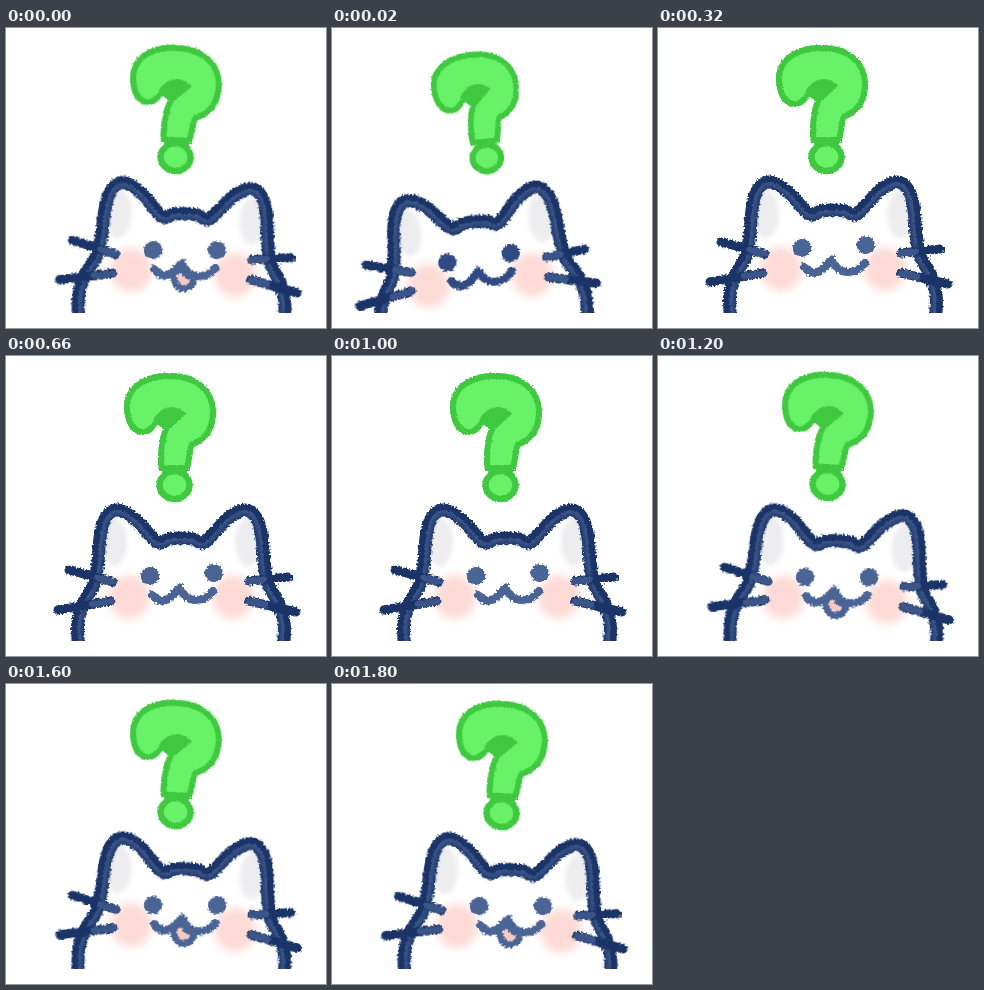
These frames come from a looping animation (320 px wide and 300 px high, 1.97 s). An HTML page:

```html
<!DOCTYPE html>
<html lang="en">
<head>
<meta charset="utf-8">
<title>Puzzled cat</title>
<style>
  html, body { margin: 0; width: 100%; height: 100%; overflow: hidden; background: #fff; }
  svg { display: block; width: 100vw; height: 100vh; }
</style>
</head>
<body>
<svg viewBox="0 0 320 300" fill="none" stroke-linecap="round" stroke-linejoin="round">
  <defs>
    <filter id="rough" filterUnits="userSpaceOnUse" x="0" y="0" width="320" height="320" color-interpolation-filters="sRGB">
      <feTurbulence id="noise" type="fractalNoise" baseFrequency="0.5" numOctaves="2" seed="1"/>
      <feDisplacementMap in="SourceGraphic" scale="5" xChannelSelector="R" yChannelSelector="G" result="d"/>
      <feGaussianBlur in="d" stdDeviation="0.5"/>
    </filter>
    <filter id="edge" filterUnits="userSpaceOnUse" x="0" y="0" width="320" height="320" color-interpolation-filters="sRGB">
      <feTurbulence type="fractalNoise" baseFrequency="0.6" numOctaves="1" seed="4"/>
      <feDisplacementMap in="SourceGraphic" scale="3" xChannelSelector="R" yChannelSelector="G"/>
    </filter>
    <filter id="soft" x="-50%" y="-50%" width="200%" height="200%"><feGaussianBlur stdDeviation="4"/></filter>
    <filter id="haze" x="-20%" y="-20%" width="140%" height="140%"><feGaussianBlur stdDeviation="2"/></filter>
    <clipPath id="paper"><rect width="320" height="285"/></clipPath>
    <clipPath id="inside"><path id="insidePath"/></clipPath>
    <path id="hook" d="M118 50C118 30 138 17 162 17C190 16 210 32 210 56C210 76 200 86 188 91C186 98 187 104 183 115L153 115C151 104 152 95 154 82C156 74 158 71 159 67C150 64 150 79 137 79C124 79 118 65 118 50Z"/>
    <clipPath id="hookClip"><use href="#hook"/></clipPath>
  </defs>
  <rect width="320" height="300" fill="#fff"/>
  <g clip-path="url(#paper)"><g id="cat"></g></g>
  <g id="mark">
    <g filter="url(#edge)" stroke="#40c840" fill="#68f268">
      <use href="#hook" stroke-width="12" clip-path="url(#hookClip)"/>
      <path d="M147 64Q160 42 180 57Q172 66 160 76Z" fill="#40c840" stroke="none"/>
      <ellipse cx="168.500" cy="129" rx="15" ry="14" stroke-width="6.500"/>
    </g>
  </g>
</svg>
<script>
const $ = id => document.getElementById(id);
const DARK = '#1a3468', PALE = '#4a6495', BLUSH = '#fddad5', SHADE = '#ededef';
const AXIS = 175, FLOOR = 285, LOOP = 1970;

// One side of the head: distance from the axis and height
const half = [[102,316], [103,285], [103,266], [97,246], [87,228], [83,205],
  [81,182], [76,163], [64,154], [46,163], [24,186], [12,183]];
const whiskers = ['M107 226L63 214', 'M105 245L52 254', 'M243 225L282 221', 'M243 245L290 256'];
const mouth = 'M146 239Q155 249 165 241Q170 236 173.500 231.500Q179 244 190 244Q201 244 207 235';
const openMouth = 'M165 242Q167 257 176 257Q186 256 187 244Q177 246 174 236Z';

// tilt turns the head, turn the question mark; alt is the shift of the second drawing
const poses = {
  left: { tilt: -6, dx: -10, dy: 8, turn: -6, size: .955, sink: -3, ink: '#304b83', alt: [-12, 3] },
  mid: { tilt: 0, dx: 0, dy: 0, turn: 0, size: 1, sink: 0, ink: PALE, alt: [0, -1] },
  right: { tilt: 2.7, dx: 0, dy: 3.5, turn: 3.7, size: 1, sink: 0, ink: PALE, alt: [0, -1], open: true }
};

// start in ms, pose, second drawing or not
const steps = [
  [0, 'right', 0], [20, 'left', 1], [170, 'left', 0],
  [320, 'mid', 0], [490, 'mid', 1], [660, 'mid', 0], [830, 'mid', 1], [1000, 'mid', 0],
  [1200, 'right', 1], [1400, 'right', 0], [1600, 'right', 1], [1800, 'right', 0]
];

// Catmull-Rom curve through points
function curve(pts) {
  const at = i => pts[Math.max(0, Math.min(pts.length - 1, i))];
  const lean = (m, s, t) => m.map((v, k) => v + (t[k] - s[k]) / 6);
  return `M${pts[0]}` + pts.slice(1).map((end, i) =>
    `C${lean(at(i), at(i - 1), end)} ${lean(end, at(i + 2), at(i))} ${end}`).join('');
}

const outline = curve([
  ...half.map(([d, y]) => [AXIS - d, y]),
  [AXIS, 182],
  ...half.map(([d, y]) => [AXIS + d, y]).reverse()
]);
$('insidePath').setAttribute('d', outline + 'Z');

const line = (d, color, width, more = '') =>
  `<path d="${d}" stroke="${color}" stroke-width="${width}" ${more}/>`;
const pair = (d, y, rx, ry, color, more = '') => [-1, 1].map(side =>
  `<ellipse cx="${AXIS + side * d}" cy="${y}" rx="${rx}" ry="${ry}" fill="${color}" ${more}/>`).join('');

function whisker(d) {
  const [x, y, u, v] = d.match(/\d+/g).map(Number);
  const root = `M${x} ${y}L${x + (u - x) * .35} ${y + (v - y) * .35}`;
  return line(d, DARK, 9) + line(root, PALE, 7, 'opacity=".7"');
}

function drawCat(pose) {
  const soft = 'filter="url(#soft)"', haze = 'filter="url(#haze)"';
  return `<path d="${outline}Z" fill="#fff"/>
    <g clip-path="url(#inside)">${pair(67, 186, 13, 24, SHADE, haze)}</g>
    ${pair(52, 241, 21, 22, BLUSH, soft)}
    <g filter="url(#rough)">
      ${line(outline, DARK, 13)}
      <g clip-path="url(#inside)">${line(outline, PALE, 8, 'opacity=".75" ' + haze)}</g>
      ${whiskers.map(whisker).join('')}
      <g transform="rotate(-2.500 176 218.500) translate(1 0)">${pair(32, 218.5, 9.3, 9, pose.ink)}</g>
      ${pose.open ? line(openMouth, pose.ink, 6.5, 'fill="#f7cbc4"') : ''}
      ${line(mouth, pose.ink, 8)}
    </g>`;
}

let shown = null;
function render(ms) {
  const t = ms % LOOP;
  const step = steps.filter(s => s[0] <= t).pop();
  if (step === shown) return;
  shown = step;
  const pose = poses[step[1]], second = step[2];
  const [ax, ay] = pose.alt.map(v => v * second);
  $('noise').setAttribute('seed', 1 + second);
  $('cat').innerHTML = drawCat(pose);
  $('cat').setAttribute('transform',
    `translate(${pose.dx + ax} ${pose.dy + ay}) rotate(${pose.tilt} ${AXIS} ${FLOOR})`);
  $('mark').setAttribute('transform',
    `translate(${168 + ax} ${146 + pose.sink + ay}) rotate(${pose.turn}) scale(${pose.size}) translate(-168 -146)`);
}

const start = performance.now();
function tick() {
  render(performance.now() - start);
  requestAnimationFrame(tick);
}
tick();
</script>
</body>
</html>
```
